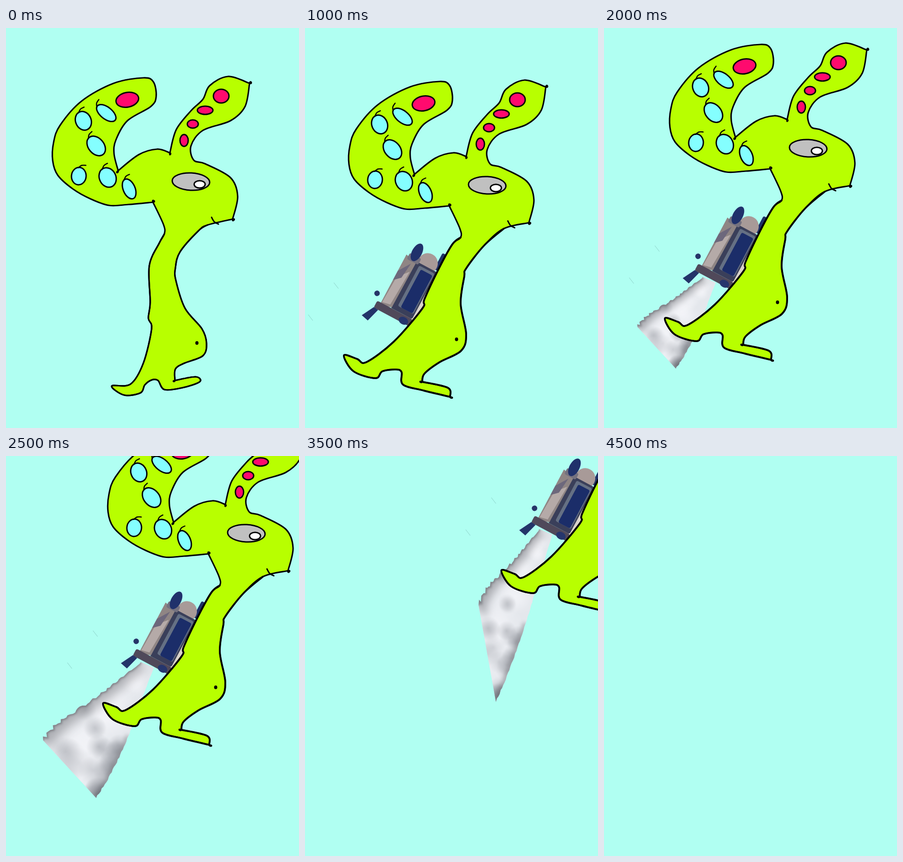
An HTML page with a canvas for the animation above (5000 ms loop, 640 by 875 pixels).

```html
<!DOCTYPE html>
<html lang="en">
<head>
<meta charset="utf-8">
<title>Jetpack creature</title>
<style>
  html, body { margin: 0; width: 100%; height: 100%; overflow: hidden; background: #b0fff2; }
  canvas { display: block; }
</style>
</head>
<body>
<canvas id="stage" width="640" height="875"></canvas>
<script>
const ctx = document.getElementById('stage').getContext('2d');
const STEP = 500, GREEN = '#b8ff00', CYAN = '#84ffff', PINK = '#ff0a6e';

const points = text => text.trim().split(/\s+/).map(pair => pair.split(',').map(Number));

// Key points of the outline, clockwise from the neck; a repeated point is a corner.
const head = points(`346,450 344,430 321,381 321,381 268,386 225,388 185,374 146,352 113,322 102,290
  104,250 118,213 165,160 235,121 300,109 322,118 328,150 316,172 265,203 240,245 236,275
  245,312 245,312 290,277 330,265 358,273 358,273 372,222 405,180 430,156 445,126 485,106
  532,121 532,121 522,172 490,203 430,224 404,258 410,289 435,297 490,327 506,368 495,418
  495,418 440,431`);

const standing = {
  line: 3.2,
  navel: [417, 689],
  outline: points(`420,444 380,490 370,525 371,552 391,613 428,658 438,690 430,717 390,733 370,746
    369,771 369,771 414,763 423,774 385,787 346,791 332,771 318,770 303,781 294,798 258,803
    231,783 272,779 300,733 318,658 311,635 315,600 313,520 335,470`)
};
const leaning = {
  line: 4,
  navel: [337, 673],
  outline: points(`397,468 358,518 354,535 346,595 358,662 347,698 300,723 267,748 262,766 262,766
    318,779 323,799 323,799 265,785 220,772 217,745 205,739 175,743 160,758 112,743 91,708
    120,716 140,723 200,678 262,606 267,585 300,515 328,465`)
};

// Ellipses: colour, centre, radii, tilt.
const spots = [
  [CYAN, 169, 203, 17, 21, -.4],
  [CYAN, 219, 186, 13, 25, -.9],
  [CYAN, 197, 258, 17, 24, -.7],
  [CYAN, 159, 324, 16, 19, .1],
  [CYAN, 222, 327, 18, 22, -.45],
  [CYAN, 269, 352, 13, 23, -.4],
  [PINK, 265, 157, 25, 16, -.2],
  [PINK, 470, 149, 17, 15, 0],
  [PINK, 435, 180, 17, 9, 0],
  [PINK, 408, 210, 12, 9, 0],
  [PINK, 389, 246, 9, 13, 0],
  ['#c0c0c0', 404, 336, 41, 19, .05],
  ['#ffffff', 423, 342, 12, 8, 0]
];

// Body offset per step of the flight, with the far right and far left smoke corners.
const flight = [
  [[-6, 8]],
  [[-6, 8], [125, 774], [60, 704]],
  [[42, -73], [157, 745], [73, 654]],
  [[121, -167], [197, 748], [81, 622]],
  [[227, -307], [195, 704], [61, 562]],
  [[338, -458], [417, 538], [379, 326]],
  [[473, -795], [552, 201], [514, -11]]
];

function curve(list, closed) {
  const n = list.length;
  const pick = i => closed ? list[(i + n) % n] : list[Math.max(0, Math.min(n - 1, i))];
  ctx.beginPath();
  ctx.moveTo(...list[0]);
  for (let i = 0; i < (closed ? n : n - 1); i++) {
    const [a, b, c, d] = [pick(i - 1), pick(i), pick(i + 1), pick(i + 2)];
    ctx.bezierCurveTo(b[0] + (c[0] - a[0]) / 6, b[1] + (c[1] - a[1]) / 6,
      c[0] - (d[0] - b[0]) / 6, c[1] - (d[1] - b[1]) / 6, ...c);
  }
  if (closed) ctx.closePath();
}

function polygon(list, color) {
  ctx.beginPath();
  list.forEach(p => ctx.lineTo(...p));
  ctx.closePath();
  ctx.fillStyle = color;
  ctx.fill();
}

function ink(width) {
  ctx.strokeStyle = '#000';
  ctx.lineWidth = width;
  ctx.lineCap = ctx.lineJoin = 'round';
  ctx.stroke();
}

function ellipse(color, x, y, rx, ry, tilt = 0) {
  ctx.beginPath();
  ctx.ellipse(x, y, rx, ry, tilt, 0, 7);
  ctx.fillStyle = color;
  ctx.fill();
}

function drawSpot(color, x, y, rx, ry, tilt) {
  ellipse(color, x, y, rx, ry, tilt);
  ink(3);
  if (color !== CYAN) return;
  ctx.save();
  ctx.translate(x, y);
  ctx.rotate(tilt);
  curve([[-3, -ry + 1], [4, -ry - 5], [13, -ry - 6]]);
  ink(2.5);
  ctx.restore();
}

function drawCreature({ outline, line, navel }) {
  curve([...head, ...outline], true);
  ctx.fillStyle = GREEN;
  ctx.fill();
  ink(3.2);
  curve([head.at(-1), ...outline, head[0]]);
  ink(line);
  spots.forEach(spot => drawSpot(...spot));
  curve([[449, 414], [455, 424], [464, 429]]);
  ink(3);
  ellipse('#000', ...navel, 3.5, 4);
}

function drawJet() {
  const box = (color, x, y, w, h) => {
    ctx.fillStyle = color;
    ctx.beginPath();
    ctx.roundRect(x, y, w, h, 4);
    ctx.fill();
  };
  ctx.save();
  ctx.translate(169, 598);
  ctx.rotate(.488);
  box('#d9d3ca', 60, -112, 25, 118);
  box('#1f3168', 68, -165, 12, 40);
  ellipse('#a89a98', 50, -130, 22, 22);
  box('#3a3f5a', 24, -122, 53, 116);
  box('#657084', 36, -117, 38, 100);
  box('#1b2d69', 43, -111, 29, 94);
  polygon([[0, -125], [27, -119], [26, -8], [0, 0]], '#8f8584');
  polygon([[4, -72], [24, -95], [20, -12], [2, -8]], '#b5aaa8');
  polygon([[0, -85], [18, -112], [14, -75], [0, -62]], '#6d687c');
  box('#50495a', -9, -6, 87, 17);
  ellipse('#26366d', 62, 6, 11, 8);
  polygon([[-9, 10], [2, 11], [-7, 42], [-24, 38]], '#233469');
  ellipse('#263468', -17, -20, 6, 6);
  box('#74717f', 5, -132, 28, 15);
  ellipse('#20316b', 18, -140, 11, 21);
  ctx.restore();

  ctx.strokeStyle = 'rgba(70,120,115,.35)';
  ctx.lineWidth = 1;
  ctx.beginPath();
  for (const [x, y] of [[69, 549], [13, 619]]) {
    ctx.moveTo(x, y);
    ctx.lineTo(x + 10, y + 13);
  }
  ctx.stroke();
}

function seeded(seed) {
  return () => (seed = seed * 16807 % 2147483647) / 2147483647;
}

function drawSmoke([x0, y0], farRight, farLeft) {
  const nearLeft = [x0 + 174, y0 + 618], nearRight = [x0 + 202, y0 + 630];
  const random = seeded(41);
  const mix = (a, b, k) => [a[0] + (b[0] - a[0]) * k, a[1] + (b[1] - a[1]) * k];
  const place = (u, v) => mix(mix(nearLeft, farLeft, v), mix(nearRight, farRight, v), u);
  const length = Math.hypot(farLeft[0] - nearLeft[0], farLeft[1] - nearLeft[1]);
  const left = [], right = [];
  for (let v = 0; v < 1; v += .02) {
    left.push(place(-.07 * Math.sin(Math.PI * v ** 3) + (random() - .5) * .06, v));
    right.unshift(place(1 + .1 * Math.sin(Math.PI * v) + (random() - .5) * .02, v));
  }
  left.push(farLeft);
  right.unshift(farRight);

  ctx.save();
  polygon([...left, ...right], '#e4e7ec');
  ctx.clip();
  const puff = (u, v, tone, size) => {
    const [x, y] = place(u, v), r = length * size * (.3 + v);
    const glow = ctx.createRadialGradient(x, y, 0, x, y, r);
    glow.addColorStop(0, `rgba(${tone},.35)`);
    glow.addColorStop(1, `rgba(${tone},0)`);
    ctx.fillStyle = glow;
    ctx.fillRect(x - r, y - r, 2 * r, 2 * r);
  };
  for (let i = 0; i < 24; i++) {
    puff(.2 + .5 * random(), random(), '250,250,254', .2);
    puff(i % 2 ? 1 : random(), .55 + random() * .5, '120,124,132', .1);
  }
  const fringe = (side, alpha, width) => {
    ctx.beginPath();
    side.forEach(p => ctx.lineTo(...p));
    ctx.filter = `blur(${width / 3}px)`;
    ctx.strokeStyle = `rgba(60,62,68,${alpha})`;
    ctx.lineWidth = width;
    ctx.stroke();
  };
  fringe(left, .35, length * .13);
  fringe(left, .4, 6);
  fringe(right.slice(0, 26), .3, 12);
  ctx.restore();
}

function draw() {
  const step = Math.floor(performance.now() / STEP) % 10;
  const [offset, ...smoke] = flight[step - 2] || [[0, 0]];
  ctx.fillStyle = '#b0fff2';
  ctx.fillRect(0, 0, 640, 875);
  if (smoke.length) drawSmoke(offset, ...smoke);
  if (step < 9) {
    ctx.save();
    ctx.translate(...offset);
    if (step > 1) drawJet();
    drawCreature(step ? leaning : standing);
    ctx.restore();
  }
  requestAnimationFrame(draw);
}
draw();
</script>
</body>
</html>
```
